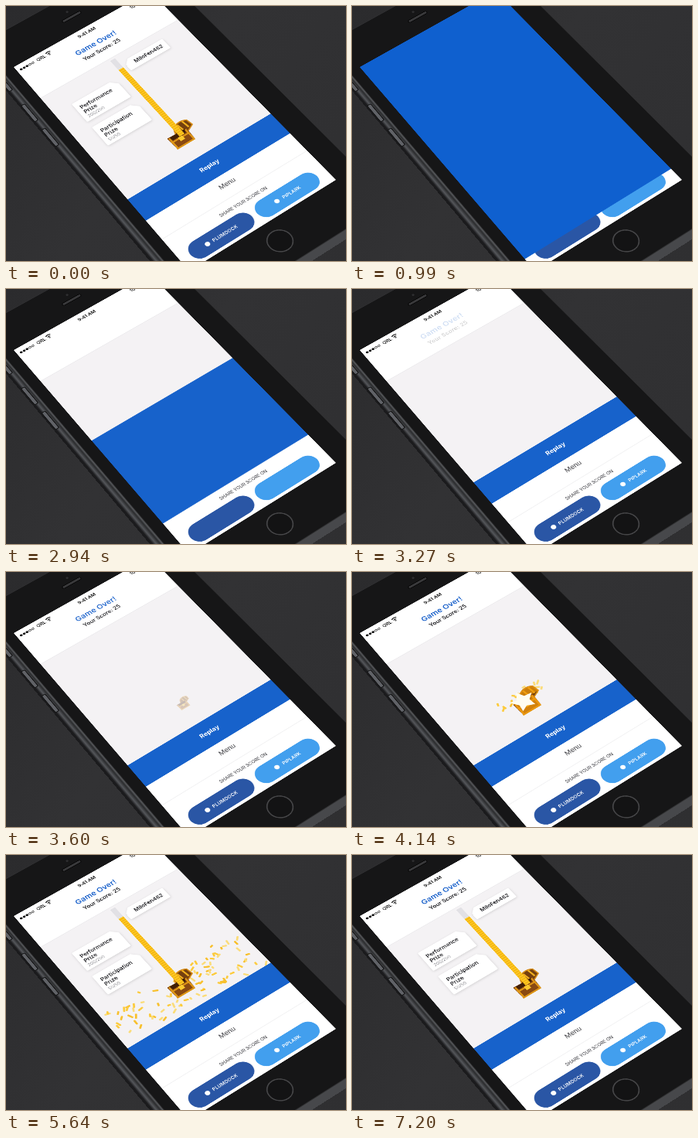
An HTML page that plays this animation: 440x330 px, repeating every 7.23 s.

```html
<!DOCTYPE html>
<html lang="en">
<head>
<meta charset="utf-8">
<title>Game over screen</title>
<style>
  html, body { margin: 0; width: 100%; height: 100%; overflow: hidden; }
  body { background: linear-gradient(125deg, #2b2b2d, #323234 45%, #2f2f31); }
  #stage { position: relative; width: 440px; height: 330px; overflow: hidden; }
  #plane { position: absolute; left: 0; top: 0; width: 375px; height: 667px; transform-origin: 0 0; }
  svg { display: block; overflow: visible; font-family: Inter, "Open Sans", sans-serif; }
  .mid { text-anchor: middle; }
  .card path { fill: #fff; filter: drop-shadow(0 2px 3px #0002); }
  .card text { font-size: 13.3px; font-weight: 600; fill: #26262a; }
  .card .small { font-size: 10.5px; font-weight: 400; fill: #8d8d92; }
  #labels { font-size: 10.3px; font-weight: 600; letter-spacing: .3px; fill: #fff; }
</style>
</head>
<body>
<div id="stage"><div id="plane">
<svg width="375" height="667" viewBox="0 0 375 667">
  <defs>
    <clipPath id="screen"><rect width="375" height="667"/></clipPath>
    <linearGradient id="rail">
      <stop offset="0" stop-color="#1c1c1e"/><stop offset=".3" stop-color="#55575b"/>
      <stop offset=".65" stop-color="#2a2b2d"/><stop offset="1" stop-color="#74767a"/>
    </linearGradient>
    <pattern id="stack" width="13" height="6" patternUnits="userSpaceOnUse">
      <rect width="13" height="6" fill="#fdc81f"/><rect y="4.6" width="13" height="1.4" fill="#e9a00c"/>
    </pattern>
  </defs>

  <!-- phone body -->
  <rect x="-50" y="-92" width="80" height="876" rx="26" fill="#1b1b1d"/>
  <rect x="-45" y="-60" width="19" height="810" fill="url(#rail)"/>
  <g fill="#606267" stroke="#161617" stroke-width="2">
    <rect x="-46" y="26" width="9" height="28" rx="3"/>
    <rect x="-46" y="104" width="9" height="56" rx="3"/>
    <rect x="-46" y="188" width="9" height="56" rx="3"/>
  </g>
  <rect x="-27" y="-105" width="457" height="897" rx="58" fill="#47484b"/>
  <rect x="-27" y="-105" width="457" height="878" rx="58" fill="#161617" stroke="#303032" stroke-width="1.5"/>
  <circle cx="187" cy="-64" r="3" fill="#2f2f31"/>
  <rect x="162" y="-49" width="50" height="8" rx="4" fill="#39393b" stroke="#080808" stroke-width="2"/>
  <circle cx="190" cy="717" r="26" fill="#131314" stroke="#48484a" stroke-width="2.5"/>

  <g clip-path="url(#screen)">
    <rect width="375" height="667" fill="#fff"/>
    <rect y="112" width="375" height="340" fill="#f4f2f4"/>
    <path d="M0 112H375" stroke="#e4e3e6"/>
    <path d="M0 573H375" stroke="#e8e8ea"/>

    <!-- status bar -->
    <g font-size="12" font-weight="500" fill="#111">
      <g id="signal" stroke="#111"></g>
      <text x="52" y="20">QRL</text>
      <path d="M79 12q6 -5 12 0M82 16q3 -3 6 0" fill="none" stroke="#111" stroke-width="2.4"/>
      <circle cx="85" cy="19" r="1.6"/>
      <text class="mid" x="188" y="20" font-weight="600">9:41 AM</text>
      <text x="309" y="20">100%</text>
    </g>

    <g id="head" class="mid" font-weight="600">
      <text x="187" y="61" font-size="19" fill="#1b62cb">Game Over!</text>
      <text x="187" y="84" font-size="13.9" fill="#242428">Your Score: 25</text>
    </g>

    <!-- prize scene -->
    <rect id="tube" x="183" y="118" width="13" height="262" fill="#e2e1e5"/>
    <g id="coins"></g>
    <g id="chest">
      <path d="M178 378L184 362Q202 348 220 359L223 376L207 384Z" fill="#74400f" stroke="#d58a14" stroke-width="3"/>
      <path d="M196 358L199 378M210 356L213 377" stroke="#f2b01e" stroke-width="4"/>
      <path d="M157 375L207 377L205 411L159 411Z" fill="#8a4a12"/>
      <path d="M161 376H203L198 386H165Z" fill="#421f06"/>
      <path d="M158 390H206M158 410H205M161 377V410M203 378V410" stroke="#dd9516" stroke-width="4"/>
      <rect x="177" y="387" width="11" height="11" fill="#fbc92e"/>
      <g id="flash">
        <path d="M159 374L207 378L205 411L159 411ZM184 362Q202 348 220 359L223 376H180Z" fill="#f29a0b" opacity=".7"/>
        <path d="M154 366L170 371L181 352L190 370L208 372L194 384L196 402L179 394L164 402L167 385Z" fill="#fffdf0"/>
      </g>
    </g>
    <rect id="fill" x="183" width="13" fill="url(#stack)"/>

    <g class="card" data-from="4900" data-dx="14">
      <path d="M218 136H310Q313 136 313 139V166Q313 169 310 169H208Q205 169 205 166V149Z"/>
      <text class="mid" x="264" y="157">MiloFen482</text>
    </g>
    <g class="card" data-from="4300" data-dx="-16">
      <path d="M49 168H147L162 183V227Q162 230 159 230H49Q46 230 46 227V171Q46 168 49 168Z"/>
      <text x="56" y="193">Performance</text><text x="56" y="208">Prize</text>
      <text class="small" x="56" y="222">200/200</text>
    </g>
    <g class="card" data-from="4480" data-dx="-16">
      <path d="M49 248H147L162 263V307Q162 310 159 310H49Q46 310 46 307V251Q46 248 49 248Z"/>
      <text x="56" y="273">Participation</text><text x="56" y="288">Prize</text>
      <text class="small" x="56" y="302">50/50</text>
    </g>

    <!-- footer -->
    <text class="mid" x="190" y="546" font-size="15" font-weight="400" fill="#3c3c40">Menu</text>
    <text class="mid" x="189" y="601" font-size="10.2" font-weight="500" fill="#55555a">SHARE YOUR SCORE ON</text>
    <rect x="25" y="614" width="156" height="46" rx="23" fill="#2a56a5"/>
    <rect x="194" y="614" width="156" height="46" rx="23" fill="#429fee"/>
    <g id="labels">
      <circle cx="68" cy="637" r="5.5"/><text x="81" y="641">PLUMDOCK</text>
      <circle cx="245" cy="637" r="5.5"/><text x="260" y="641">PIPLARK</text>
    </g>

    <rect id="band" width="375"/>
    <text id="replay" class="mid" x="188" y="487" font-size="14.5" font-weight="700" fill="#fff">Replay</text>
    <text id="game" class="mid" x="188" y="342" font-size="13" font-weight="700" letter-spacing=".4" fill="#fff">GAME SCREEN</text>
  </g>
</svg>
</div></div>

<script>
const LOOP = 7230, BAND_TOP = 450, BAND_END = 516, FULL = 151, FLOOR = 382;
const $ = id => document.getElementById(id);
const set = (el, attrs) => { for (const k in attrs) el.setAttribute(k, attrs[k]); };
const make = (parent, tag, attrs) => {
  const el = document.createElementNS('http://www.w3.org/2000/svg', tag);
  set(el, attrs);
  return parent.appendChild(el);
};
const part = (t, a, b) => Math.min(1, Math.max(0, (t - a) / (b - a)));
const inOut = x => x < .5 ? 2 * x * x : 1 - 2 * (1 - x) ** 2;
const out = x => 1 - (1 - x) ** 3;
const mix = (a, b, x) => a + (b - a) * x;

// Perspective matrix that maps a w x h rectangle onto four corners.
function quad(w, h, [x0, y0], [x1, y1], [x2, y2], [x3, y3]) {
  const ax = x1 - x2, ay = y1 - y2, bx = x3 - x2, by = y3 - y2;
  const sx = x0 - x1 + x2 - x3, sy = y0 - y1 + y2 - y3;
  const d = ax * by - bx * ay;
  const g = (sx * by - bx * sy) / d, k = (ax * sy - sx * ay) / d;
  return `matrix3d(${[
    (x1 - x0 + g * x1) / w, (y1 - y0 + g * y1) / w, 0, g / w,
    (x3 - x0 + k * x3) / h, (y3 - y0 + k * y3) / h, 0, k / h,
    0, 0, 1, 0, x0, y0, 0, 1].map(n => n.toFixed(9))})`;
}
$('plane').style.transform = quad(375, 667, [10, 79], [186, -19.5], [427, 225], [237, 343]);

for (let i = 0; i < 5; i++)
  make($('signal'), 'circle', { cx: 10 + i * 7.8, cy: 16, r: 2.7, fill: i < 3 ? '#111' : '#fff' });

let seed = 11;
const rand = () => (seed = seed * 16807 % 2147483647) / 2147483647;
const coins = Array.from({ length: 95 }, () => ({
  x: mix(15, 368, rand()), y: mix(350, 446, rand()), lift: 15 + rand() * 75,
  start: 4030 + rand() ** 2 * 900, span: 650 + rand() * 450,
  turn: rand() * 180, spin: rand() * 700 - 350, end: 5950 + rand() * 700,
  el: make($('coins'), 'rect', {
    x: -6, y: -2.5, width: 7 + rand() * 7, height: 4.5, rx: 1.5,
    fill: ['#fccb3c', '#fbdc78', '#f8c02c'][Math.floor(rand() * 3)]
  })
}));
const cards = [...document.querySelectorAll('.card')];

function draw(t) {
  // The opening moments continue the finished scene of the previous round.
  const s = t < 1900 ? t + LOOP : t;

  const closing = t > 2200;
  const top = closing ? 1 - inOut(part(t, 2610, 3150)) : inOut(part(t, 510, 960));
  const end = closing ? 1 - inOut(part(t, 2610, 3210)) : inOut(part(t, 510, 1240));
  const y = mix(BAND_TOP, 0, top);
  const vivid = part(t, 510, 960) * (1 - part(t, 1260, 1950));
  set($('band'), {
    y, height: mix(BAND_END, 667, end) - y,
    fill: `rgb(${mix(23, 15, vivid)} ${mix(98, 96, vivid)} ${mix(203, 207, vivid)})`
  });
  const words = closing ? part(t, 2950, 3230) : 1 - part(t, 510, 740);
  set($('replay'), { opacity: words });
  set($('labels'), { opacity: words });
  set($('game'), { opacity: closing ? 1 - part(t, 2610, 2850) : part(t, 1260, 1650) });

  const head = part(s, 3180, 3640);
  set($('head'), { opacity: head, 'letter-spacing': 1 - out(head) });

  const grow = out(part(s, 3560, 4000));
  set($('chest'), {
    opacity: part(s, 3560, 3720),
    transform: `translate(188 396) scale(${mix(.3, 1, grow)}) translate(-187 -400)`
  });
  set($('flash'), { opacity: part(s, 3980, 4090) * (1 - part(s, 4180, 4420)) });

  set($('tube'), { opacity: part(s, 4260, 4480) });
  const level = mix(FLOOR, FULL, inOut(part(s, 4420, 5500)));
  set($('fill'), { y: level, height: FLOOR - level });

  for (const c of coins) {
    const p = part(s, c.start, c.start + c.span), q = out(p);
    const cx = mix(188, c.x, q), cy = mix(380, c.y, p) - c.lift * 4 * p * (1 - p);
    set(c.el, {
      transform: `translate(${cx} ${cy}) rotate(${c.turn + c.spin * q})`,
      opacity: p > 0 ? 1 - part(s, c.end, c.end + 350) : 0
    });
  }

  for (const card of cards) {
    const from = +card.dataset.from, p = out(part(s, from, from + 380));
    set(card, { opacity: p, transform: `translate(${card.dataset.dx * (1 - p)} 0)` });
  }
}

const began = performance.now();
(function tick() {
  draw((performance.now() - began) % LOOP);
  requestAnimationFrame(tick);
})();
</script>
</body>
</html>
```
